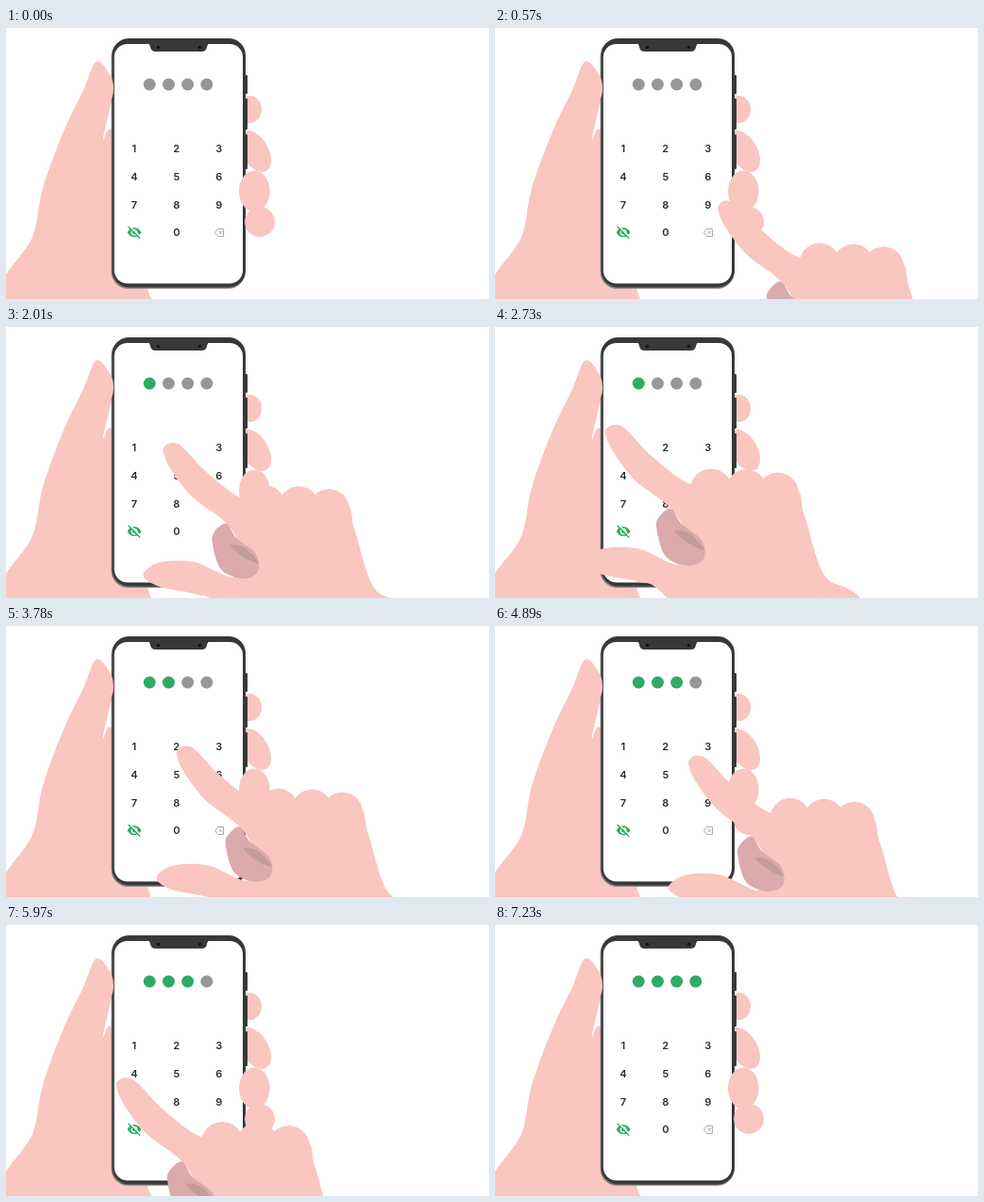
An HTML page that plays this animation: 512x288 px, repeating every 8100 ms.

```html
<!DOCTYPE html>
<html lang="en">
<head>
<meta charset="utf-8">
<title>PIN entry</title>
<style>
html, body { margin: 0; width: 100%; height: 100%; overflow: hidden; background: #fff; }
svg { display: block; width: 512px; height: 288px; }
.skin { fill: #f9c6c0; }
.dark { fill: #38383a; }
.keys { font: 600 11px Inter, Roboto, sans-serif; fill: #2b2b2d; text-anchor: middle; }
</style>
</head>
<body>
<svg viewBox="0 0 512 288" xmlns="http://www.w3.org/2000/svg">
  <g id="grip" class="skin"></g>

  <g class="dark">
    <rect x="252" y="50" width="4" height="20" rx="1"/>
    <rect x="252" y="75" width="4" height="33" rx="1"/>
    <rect x="252" y="113" width="4" height="37" rx="1"/>
  </g>
  <rect x="111.6" y="12" width="142" height="265" rx="18" fill="#7b7b7d"/>
  <rect class="dark" x="112.5" y="11" width="141.5" height="264.5" rx="18"/>
  <rect x="114.8" y="17" width="136.2" height="254.5" rx="14" fill="#fff"/>
  <path class="dark" d="M150 16H216Q213.5 17 213 20Q212.5 25 207.5 25H158.5Q153.5 25 153 20Q152.5 17 150 16Z"/>
  <g fill="#111113">
    <circle cx="161.5" cy="20.5" r="1.7"/>
    <circle cx="205.5" cy="20.5" r="1.7"/>
  </g>

  <g id="dots"></g>
  <g id="keys" class="keys"></g>

  <g transform="translate(136 217.3)" fill="#2fab66">
    <path d="M-7.4 0Q-4.6-5 0-5T7.4 0Q4.6 5 0 5T-7.4 0Z"/>
    <circle r="3.4" fill="#fff"/>
    <circle r="2.1"/>
    <path d="M-5-6.8L7.2 5.4" stroke="#fff" stroke-width="1.5"/>
    <path d="M-6.4-6.2L6.2 6.4" stroke="#2fab66" stroke-width="1.4"/>
  </g>
  <path d="M224.5 213.5H230.5V221.5H224.5L221.5 217.5ZM225.8 215.8l3 3.4m0-3.4l-3 3.4"
    fill="none" stroke="#a9a9ab" stroke-linejoin="round"/>

  <g id="front" class="skin"></g>
  <g id="hand" class="skin"></g>
</svg>
<script>
const NS = 'http://www.w3.org/2000/svg';
const $ = id => document.getElementById(id);

function add(parent, tag, attrs, text) {
  const el = document.createElementNS(NS, tag);
  for (const k in attrs) el.setAttribute(k, attrs[k]);
  if (text !== undefined) el.textContent = text;
  parent.appendChild(el);
  return el;
}

// closed smooth curve through "x,y x,y ..."
function blob(parent, list, fill = 'inherit') {
  const p = list.trim().split(/\s+/).map(s => s.split(',').map(Number));
  const at = i => p[(i + p.length) % p.length];
  const d = p.map((b, i) => {
    const a = at(i - 1), c = at(i + 1), e = at(i + 2);
    const c1 = b.map((v, j) => v + (c[j] - a[j]) / 6);
    const c2 = c.map((v, j) => v - (e[j] - b[j]) / 6);
    return `C${c1} ${c2} ${c}`;
  });
  add(parent, 'path', { d: 'M' + p[0] + d.join(''), style: `fill:${fill}` });
}

function oval(parent, cx, cy, rx, ry, turn = 0) {
  add(parent, 'ellipse', { cx, cy, rx, ry, transform: `rotate(${turn} ${cx} ${cy})` });
}

// holding hand: arm and two fingers behind the phone, the rest in front
blob($('grip'), `95,36 108,46 113.5,66 109,90 103,119 113,110 140,180 150,274 146,290
  60,310 -20,300 0,262 28,222 39,170 61,110 82,66`);
oval($('grip'), 258.5, 86.5, 12.5, 14.5);
oval($('grip'), 264, 131, 14, 24, -30);
oval($('front'), 104, 64, 10, 18);
oval($('front'), 263.3, 173.5, 16.3, 22);
oval($('front'), 269, 206, 16, 16);

// pointing hand: index finger, back of the hand, thumb
const hand = $('hand');
blob(hand, `204,142 207,135 215,132.5 226,138 254,167 293,195 330,196 400,198 413,228
  434,291 472,315 540,400 360,420 268,314 238,298 200,290 182,277 200,263.5 238,263
  280,280 294,262 275,223 236,192 212,161`);
for (let i = 0; i < 3; i++) oval(hand, 315 + 39 * i - 2 * i * i, 201 + i * i, 22, 22);
blob(hand, '273,221 261,229 257.5,241 267,271 290,281 307,274 305,254 284,237', '#dbaaab');
blob(hand, '277,245 292,247 308,264 292,258', '#c19c98');

const dots = [0, 1, 2, 3].map(i => add($('dots'), 'circle', { cx: 152.2 + 20.2 * i, cy: 60, r: 6.5 }));
[...'123456789 0'].forEach((ch, i) =>
  add($('keys'), 'text', { x: 135.8 + 45 * (i % 3), y: 132 + 29.8 * Math.floor(i / 3) }, ch));

// each leg: travel to the next stop, tap there, wait
const LEG = 1620, TRAVEL = 800, TAP = 550;
const PIVOT = [359, 271];
const stops = [[456, 435], PIVOT, [273.5, 243.5], PIVOT, [273.5, 302], [415, 432]];
const clamp = v => Math.max(0, Math.min(1, v));

function draw(time) {
  const t = time % (LEG * 5);
  const leg = Math.floor(t / LEG);
  const local = t - leg * LEG;
  const u = clamp(local / TRAVEL);
  const tap = 1 - Math.abs(2 * clamp((local - TRAVEL) / TAP) - 1);
  const [x, y] = stops[leg].map((v, i) => v + (stops[leg + 1][i] - v) * u);
  const scale = 0.971 + 0.0437 * tap;
  hand.setAttribute('transform',
    `translate(${x} ${y}) scale(${scale}) translate(${-PIVOT[0]} ${-PIVOT[1]})`);
  dots.forEach((dot, i) =>
    dot.setAttribute('fill', t >= i * LEG + TRAVEL + TAP - 60 ? '#2fab66' : '#979797'));
}

const start = performance.now();
function tick() {
  draw(performance.now() - start);
  requestAnimationFrame(tick);
}
draw(0);
requestAnimationFrame(tick);
</script>
</body>
</html>
```
